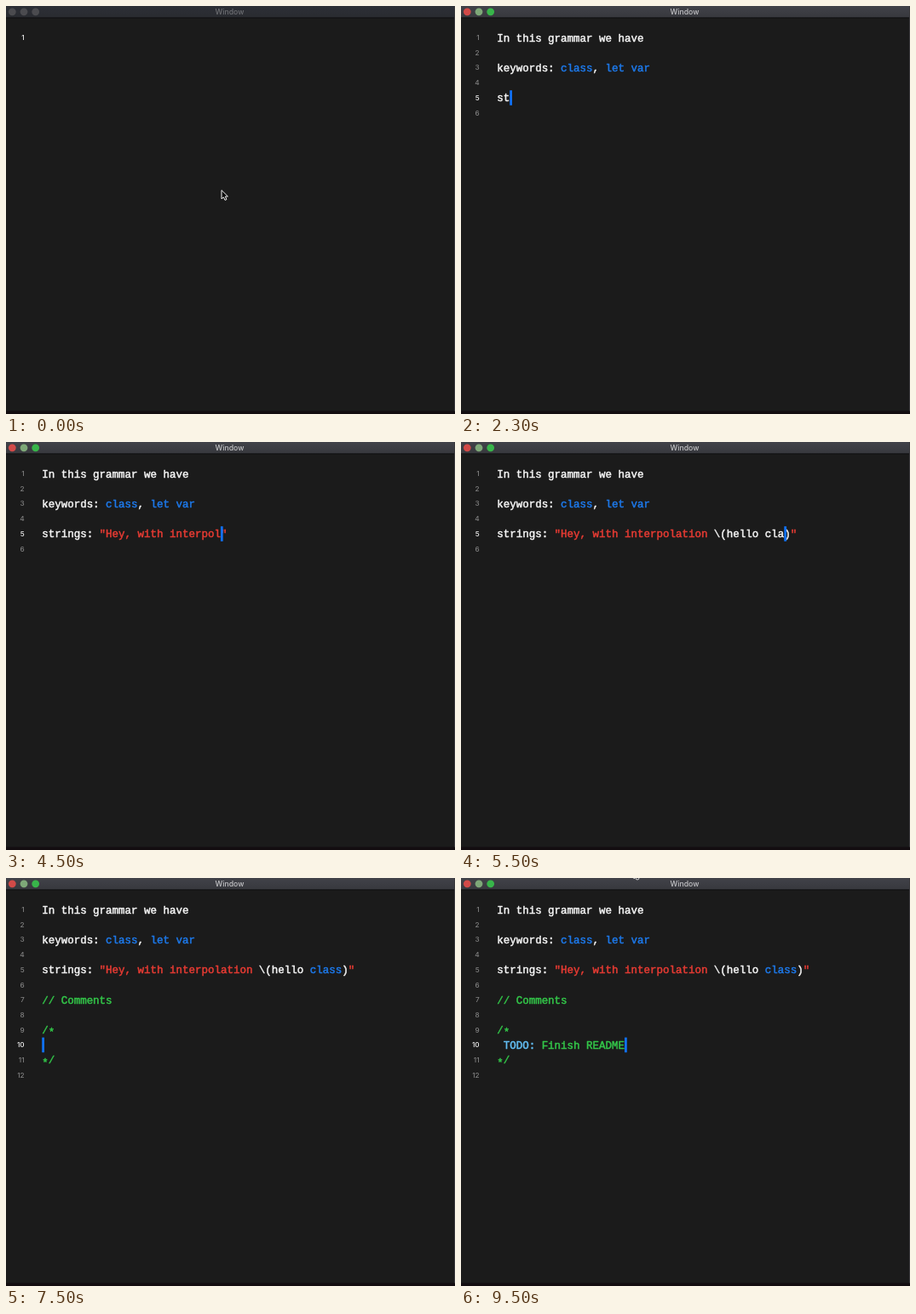
Animation of 527x480 px, one loop 9600 ms. Source, as an HTML page with a canvas:

```html
<!DOCTYPE html>
<html lang="en">
<head>
<meta charset="utf-8">
<title>Window</title>
<style>
  html, body { margin: 0; width: 527px; height: 480px; overflow: hidden; background: #1b1b1b; }
  canvas { display: block; }
</style>
</head>
<body>
<canvas id="stage" width="527" height="480"></canvas>
<script>
const ctx = document.getElementById('stage').getContext('2d');
const LOOP = 9600, STEP = 100;
const LEFT = 42.2, ADVANCE = 7.49, TOP = 37.3, LEADING = 17.68;
const CODE_FONT = '12.5px "Liberation Mono", "DejaVu Sans Mono", monospace';
const COLORS = {
  plain: '#f4f4f4', keyword: '#1d78e8', string: '#e63b33',
  comment: '#33c649', todo: '#62bdf2', caret: '#1070f5'
};

const TYPED = [
  'In this grammar we have', '',
  'keywords: class, let var', '',
  'strings: "Hey, with interpolation \\(hello class)"', '',
  '// Comments', '',
  '/*', ' TODO: Finish README'
].join('\n');

// [time, characters typed before the caret]
const KEYS = [
  [0, 0], [200, 0], [1000, 23], [1200, 25], [1500, 29], [2000, 48], [2100, 51],
  [3000, 59], [3200, 61], [3300, 61], [4000, 67], [4500, 79], [5000, 87],
  [5500, 96], [5600, 98], [5700, 98], [5800, 100], [5900, 102], [6000, 102],
  [7000, 118], [7600, 118], [8000, 120], [9000, 137], [9100, 138], [LOOP, 138]
];

function typedCount(t) {
  const i = KEYS.findIndex(k => k[0] > t);
  const [t0, n0] = KEYS[i - 1], [t1, n1] = KEYS[i];
  return Math.round(n0 + (n1 - n0) * (t - t0) / (t1 - t0));
}

// Text standing after the typed part
function tailAt(t) {
  if (t >= 3300 && t < 5000) return '"';
  if (t >= 5000 && t < 5800) return ')"';
  if (t >= 7100) return '\n*/'.slice(0, t < 7200 ? 1 : t < 7300 ? 2 : 3);
  return '';
}

function highlight(text) {
  const out = new Array(text.length).fill(COLORS.plain);
  const mark = (re, src, base, color) => {
    for (const m of src.matchAll(re)) out.fill(color, base + m.index, base + m.index + m[0].length);
  };
  const keywords = /\b(class|let|var)\b/g;
  const token = /\/\*[\s\S]*?(\*\/|$)|\/\/.*|"[^"\n]*"?|\b(class|let|var)\b/g;
  for (const m of text.matchAll(token)) {
    const s = m[0], at = m.index;
    if (s[0] === '/') {
      out.fill(COLORS.comment, at, at + s.length);
      mark(/TODO:/g, s, at, COLORS.todo);
    } else if (s[0] === '"') {
      out.fill(COLORS.string, at, at + s.length);
      for (const p of s.matchAll(/\\\(.*?\)/g)) {
        out.fill(COLORS.plain, at + p.index, at + p.index + p[0].length);
        mark(keywords, p[0], at + p.index, COLORS.keyword);
      }
    } else {
      out.fill(COLORS.keyword, at, at + s.length);
    }
  }
  return out;
}

function disc(x, y, r, color) {
  ctx.fillStyle = color;
  ctx.beginPath();
  ctx.arc(x, y, r, 0, Math.PI * 2);
  ctx.fill();
}

function drawWindow(active) {
  ctx.fillStyle = '#1b1b1b';
  ctx.fillRect(0, 0, 527, 480);
  const bar = ctx.createLinearGradient(0, 0, 0, 14);
  bar.addColorStop(0, active ? '#414249' : '#2d2f36');
  bar.addColorStop(1, active ? '#37383d' : '#292b30');
  ctx.fillStyle = bar;
  ctx.fillRect(0, 0, 527, 13.5);
  ctx.fillStyle = '#111112';
  ctx.fillRect(0, 13.5, 527, 1);
  ctx.fillStyle = '#130d10';
  ctx.fillRect(0, 476.5, 527, 3.5);
  ctx.fillStyle = '#38373a';
  ctx.fillRect(526, 0, 1, 476.5);

  const lights = active ? ['#d24a48', '#7ea878', '#38b54a'] : ['#4b4b4f', '#4b4b4f', '#4b4b4f'];
  lights.forEach((c, i) => disc(7.3 + 13.7 * i, 6.8, 4.4, c));

  ctx.font = '500 8.7px Inter, "Liberation Sans", sans-serif';
  ctx.textAlign = 'center';
  ctx.fillStyle = active ? '#c3c3c6' : '#6e6f73';
  ctx.fillText('Window', 262.5, 10);
}

function drawNumbers(count, current) {
  ctx.textAlign = 'right';
  ctx.font = '500 8.2px Inter, "Liberation Sans", sans-serif';
  for (let i = 0; i < count; i++) {
    ctx.fillStyle = i === current ? '#eeeeee' : '#808080';
    ctx.fillText(i + 1, 21.6, TOP + LEADING * i + 2.8);
  }
}

function drawCode(text) {
  const colors = highlight(text);
  let row = 0, col = 0;
  ctx.font = CODE_FONT;
  ctx.textAlign = 'left';
  ctx.lineJoin = 'round';
  ctx.lineWidth = 0.5;
  [...text].forEach((ch, i) => {
    if (ch === '\n') { row++; col = 0; return; }
    const x = LEFT + ADVANCE * col;
    const y = TOP + LEADING * row + 4.2 + (ch === '*' ? 2.5 : 0);
    ctx.fillStyle = ctx.strokeStyle = colors[i];
    ctx.fillText(ch, x, y);
    ctx.strokeText(ch, x, y);
    col++;
  });
}

function drawPointer(x, y) {
  ctx.beginPath();
  [[0, 0], [0, 10.2], [2.4, 8.2], [4, 11.7], [5.9, 10.9], [4.4, 7.4], [7.4, 7.3]]
    .forEach(([dx, dy]) => ctx.lineTo(x + dx, y + dy));
  ctx.closePath();
  ctx.fillStyle = '#0c0c0c';
  ctx.fill();
  ctx.strokeStyle = '#f2f2f2';
  ctx.lineWidth = 1;
  ctx.stroke();
}

function drawTopSliver() {
  ctx.fillStyle = '#d8d8d8';
  ctx.fillRect(202.5, 0, 1.5, 1);
  ctx.strokeStyle = '#d8d8d8';
  ctx.lineWidth = 1;
  ctx.beginPath();
  ctx.arc(207, 0, 2, 0, Math.PI);
  ctx.stroke();
}

function draw(t) {
  const active = t >= 100;
  const before = TYPED.slice(0, typedCount(t));
  const text = before + tailAt(t);
  const caretText = t >= 7100 && t < 7400 ? text : before;
  const path = caretText.split('\n');
  const row = path.length - 1, col = path[row].length;

  drawWindow(active);
  drawNumbers(text.split('\n').length + (text ? 1 : 0), row);
  drawCode(text);
  if (active) {
    ctx.fillStyle = COLORS.caret;
    ctx.fillRect(LEFT + ADVANCE * col, TOP + LEADING * row - 8.8, 2.8, 17.6);
  }
  if (t < 300) drawPointer(253, 216.7);
  if (t >= 9400) drawTopSliver();
}

const start = performance.now();
function tick() {
  const t = (performance.now() - start) % LOOP;
  draw(Math.floor(t / STEP) * STEP);
  requestAnimationFrame(tick);
}
tick();
</script>
</body>
</html>
```
